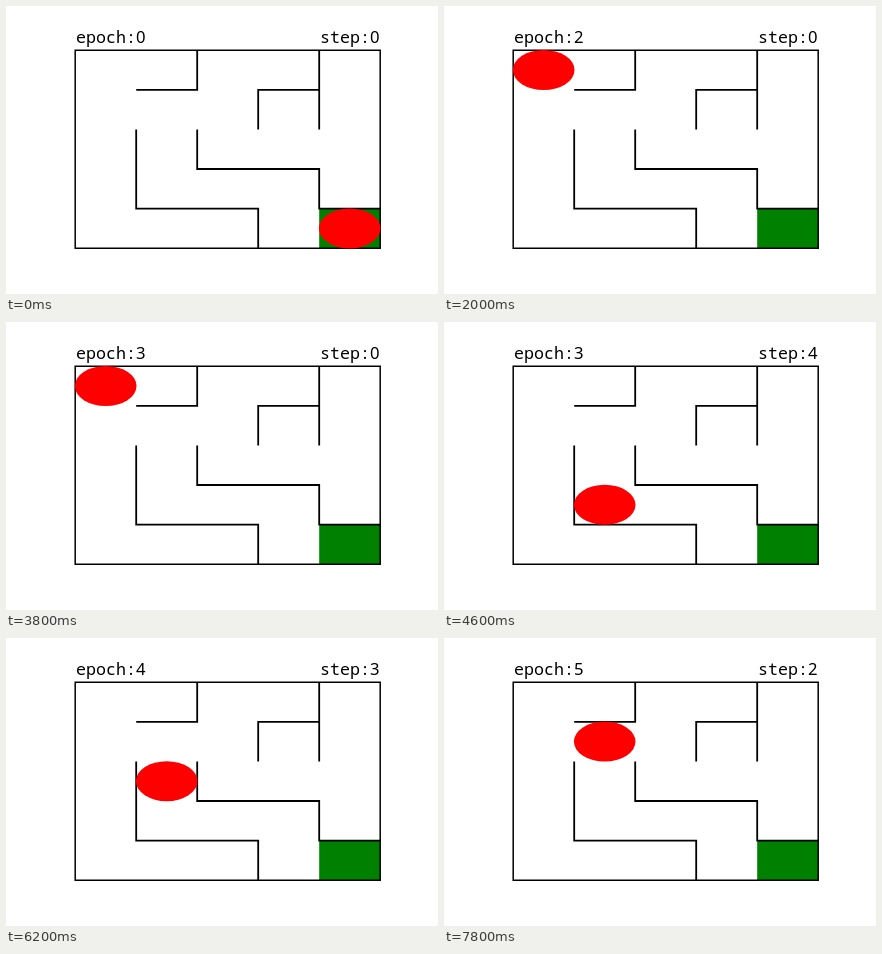
Animation, 432 px wide and 288 px high, one loop 8 s. Source, as an HTML page:

```html
<!DOCTYPE html>
<html lang="en">
<head>
<meta charset="utf-8">
<title>Maze walk</title>
<style>
  html, body { margin: 0; width: 100%; height: 100%; overflow: hidden; background: #fff; }
  svg { display: block; width: 432px; height: 288px; }
  text { font: 16.67px "Noto Sans Mono", monospace; }
  tspan { font-family: "Noto Sans", sans-serif; }
  path { fill: none; stroke: #000; vector-effect: non-scaling-stroke; }
  .border { stroke-width: 1.5; stroke-linecap: square; }
  .walls { stroke-width: 1.8; }
</style>
</head>
<body>
<svg viewBox="0 0 432 288">
  <text x="70" y="37">epoch:<tspan id="epoch">0</tspan></text>
  <text x="314" y="37">step:<tspan id="step">0</tspan></text>
  <!-- one unit is one maze cell -->
  <g transform="translate(69.2 44.2) scale(61 39.6)">
    <rect x="4" y="4" width="1" height="1" fill="#008000"/>
    <path class="border" d="M0 0H5V5H0Z"/>
    <path class="walls" d="M1 1H2V0 M4 0V2 M4 1H3V2 M1 2V4H3V5 M2 2V3H4V4H5"/>
    <ellipse id="ball" rx=".505" ry=".505" fill="#f00"/>
  </g>
</svg>
<script>
  const FRAME = 200, LOOP = 8000;
  const route = [[0, 0], [0, 1], [1, 1], [1, 2], [1, 3], [2, 3], [3, 3], [3, 4], [4, 4]];
  const [ball, epochLabel, stepLabel] =
    ["ball", "epoch", "step"].map(id => document.getElementById(id));
  const start = performance.now();

  function draw(now) {
    const tick = Math.floor(Math.max(0, now - start) % LOOP / FRAME);
    const epoch = Math.ceil(tick / route.length);
    const step = tick ? (tick - 1) % route.length : 0;
    // before the first epoch the ball rests on the goal
    const [col, row] = tick ? route[step] : route[route.length - 1];
    ball.setAttribute("cx", col + 0.5);
    ball.setAttribute("cy", row + 0.5);
    epochLabel.textContent = epoch;
    stepLabel.textContent = step;
    requestAnimationFrame(draw);
  }
  draw(start);
</script>
</body>
</html>
```
